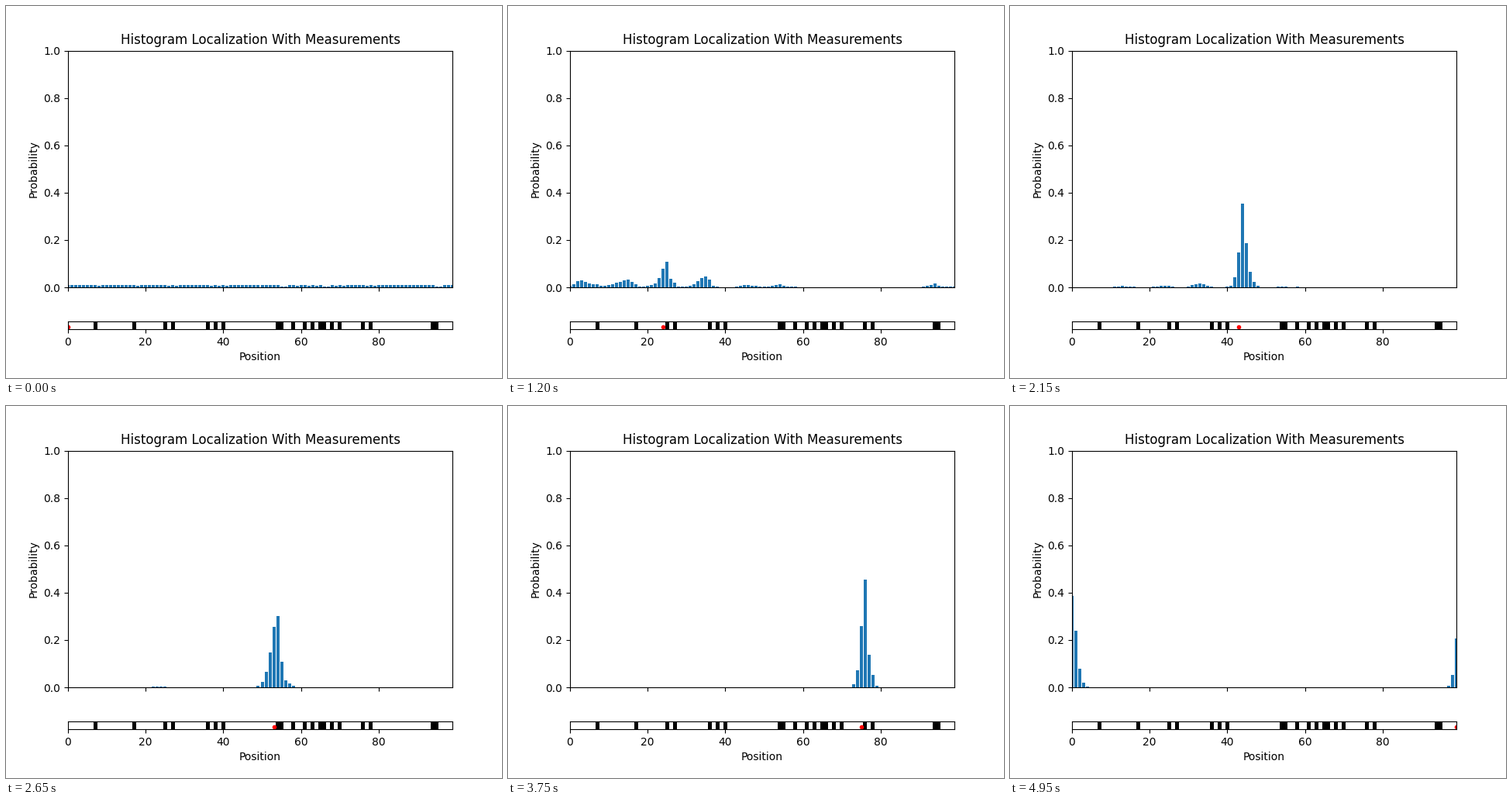
Recreate the animation shown at these times as a matplotlib script. Size 640 by 480 pixels, loop 5 s.

```python
import numpy as np
import matplotlib.pyplot as plt
from matplotlib.animation import FuncAnimation

CELLS = 100
LANDMARKS = [7, 17, 25, 27, 36, 38, 40, 54, 55, 58,
             61, 63, 65, 66, 68, 70, 76, 78, 94, 95]
P_HIT, P_MISS = 0.6, 0.2
P_EXACT, P_SLIP = 0.8, 0.1

world = np.zeros(CELLS, dtype=bool)
world[LANDMARKS] = True


def sense(belief, seen):
    weighted = belief * np.where(world == seen, P_HIT, P_MISS)
    return weighted / weighted.sum()


def move(belief):
    """Shift one cell forward on the ring, with under- and overshoot."""
    return (P_EXACT * np.roll(belief, 1)
            + P_SLIP * (belief + np.roll(belief, 2)))


def run_filter():
    belief = np.full(CELLS, 1 / CELLS)
    history = []
    for position in range(CELLS):
        belief = move(sense(belief, world[position]))
        history.append(belief)
    return history


history = run_filter()
cells = np.arange(CELLS)

plt.rcParams["font.family"] = "DejaVu Sans"
fig, (ax, track) = plt.subplots(
    2, 1, sharex=True, figsize=(6.4, 4.8), dpi=100,
    gridspec_kw={"height_ratios": [10, 1]})

ax.set_title("Histogram Localization With Measurements")
ax.set_ylabel("Probability")
bars = ax.bar(cells, history[0])
ax.set_ylim(0, 1)

track.bar(LANDMARKS, 2, width=1, color="black")
robot, = track.plot([0], [0.5], "r.")
track.set_xlabel("Position")
track.set_xlim(0, CELLS - 1)
track.set_ylim(0, 2)
track.set_yticks([])
track.set_aspect("equal")


def update(position):
    for bar, height in zip(bars, history[position]):
        bar.set_height(height)
    robot.set_data([position], [0.5])
    return [*bars, robot]


anim = FuncAnimation(fig, update, frames=CELLS, interval=50,
                     repeat=True, repeat_delay=0)
plt.show()
```
